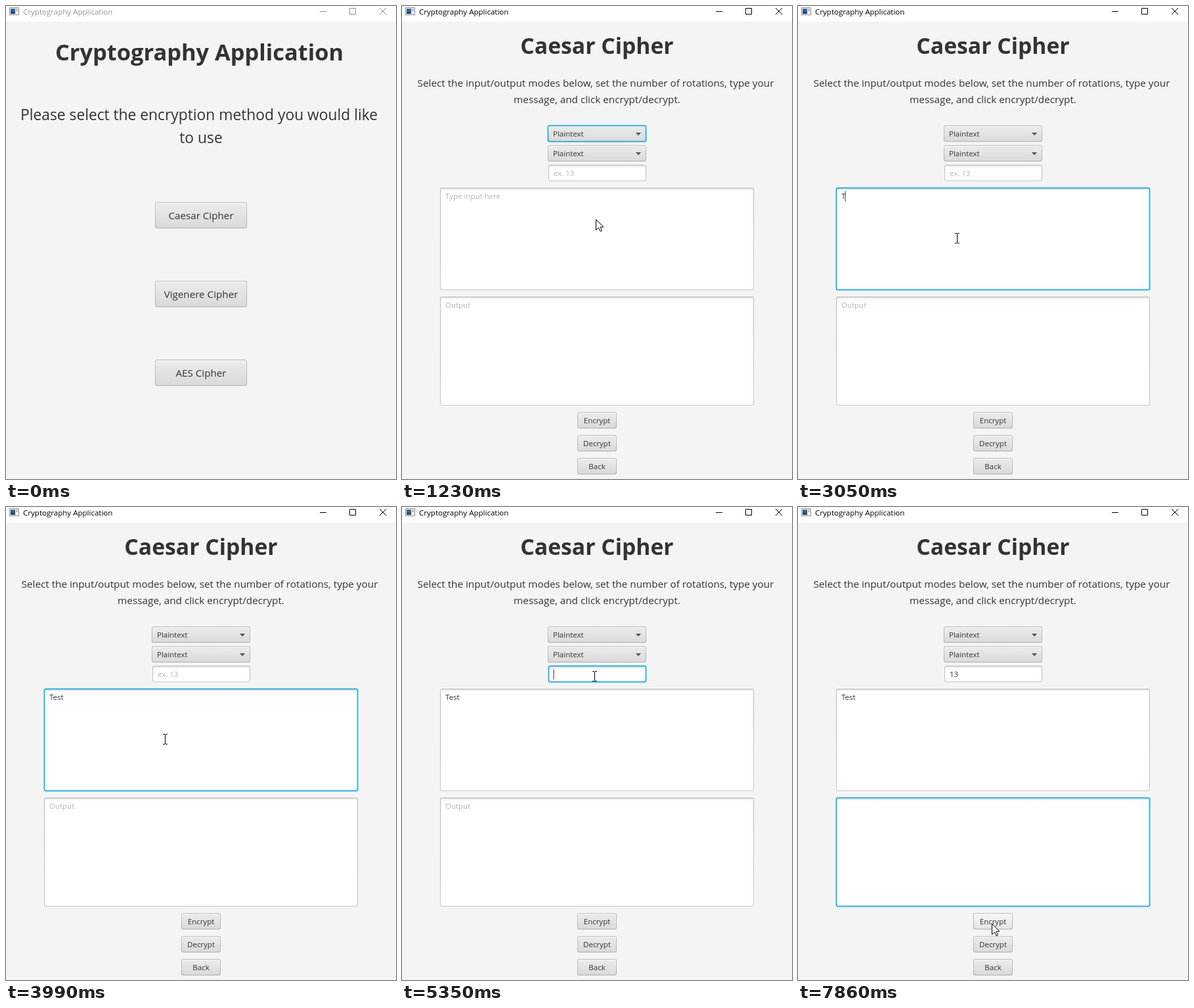
Animation of 594x721 px, one loop 7990 ms. Source, as an HTML page with a canvas:

```html
<!DOCTYPE html>
<html lang="en">
<head>
<meta charset="utf-8">
<title>Cryptography Application</title>
<style>
html, body { margin: 0; width: 100%; height: 100%; overflow: hidden; background: #f4f4f4; }
canvas { display: block; }
</style>
</head>
<body>
<canvas id="stage" width="594" height="721"></canvas>
<script>
const ctx = document.getElementById('stage').getContext('2d');
const LOOP = 7990, INK = '#333', PROMPT = '#afb7b4', FOCUS = '#039ed3', SMALL = 11.5;

// Pointer moves: first step, last step, number of steps, points to pass
const MOVES = [
  [190, 960, 12, [545, 745], [440, 560], [330, 370], [295, 325]],
  [1360, 1770, 7, [296, 270], [297, 222]],
  [1840, 1910, 2, [296, 252]],
  [2180, 2390, 4, [222, 327]],
  [2460, 2720, 4, [242, 354]],
  [4320, 5080, 12, [275, 290], [294, 230], [292, 258]],
  [5350, 5350, 1, [293, 258]],
  [5410, 5480, 2, [293, 259]],
  [5620, 6360, 11, [270, 350], [207, 457]],
  [6430, 6570, 3, [181, 485]],
  [7450, 7860, 7, [240, 570], [305, 628], [295, 635]]
];
const ACTIVE = 1020, PAGE = 1160, INPUT_CLICK = 2720, KEY_CLICK = 5080, OUTPUT_CLICK = 7170;
const MESSAGE_KEYS = [3050, 3250, 3450, 3520], NUMBER_KEYS = [5830, 6070];

const FIRST = [227, 299, 140, 40];
const MODE_IN = [222, 182, 150, 25], MODE_OUT = [222, 212, 150, 25], NUMBER = [223, 242, 149, 25];
const INPUT = [58, 277, 478, 156], OUTPUT = [58, 443, 478, 166];

function pointer(t) {
  let at = null;
  for (const [from, to, steps, ...points] of MOVES) {
    if (t < from) break;
    const path = at ? [at, ...points] : points;
    const step = to > from ? Math.floor((t - from) / (to - from) * (steps - 1) + 1e-6) : 0;
    const u = Math.min(1, (step + 1) / steps) * (path.length - 1);
    const i = Math.min(path.length - 2, Math.floor(u)), f = u - i;
    at = [0, 1].map(k => Math.round(path[i][k] + (path[i + 1][k] - path[i][k]) * f));
  }
  return at;
}

const inside = (p, [x, y, w, h]) => p && p[0] >= x && p[0] < x + w && p[1] >= y && p[1] < y + h;
const typed = (word, keys, t) => word.slice(0, keys.filter(k => t >= k).length);

// The caret restarts its blink at each click or key press
function caretOn(t, start, keys) {
  const last = [start, ...keys].filter(k => k <= t).pop();
  return Math.floor((t - last) / 470 + 1e-6) % 2 === 0;
}

function text(s, x, y, size, { color = INK, align = 'left', weight = 400 } = {}) {
  ctx.font = `${weight} ${size}px "Open Sans", "Noto Sans", sans-serif`;
  ctx.textAlign = align;
  ctx.fillStyle = color;
  ctx.fillText(s, x, y);
}
const centered = (s, y, size, weight, x = 297) => text(s, x, y, size, { align: 'center', weight });

function round([x, y, w, h], inset, r, fill) {
  ctx.beginPath();
  ctx.roundRect(x + inset, y + inset, w - 2 * inset, h - 2 * inset, r);
  ctx.fillStyle = fill;
  ctx.fill();
}

function shade([, y, , h], ...colors) {
  const g = ctx.createLinearGradient(0, y, 0, y + h);
  colors.forEach((c, i) => g.addColorStop(i / (colors.length - 1), c));
  return g;
}

// Solid focus line with a faint glow on both sides
function ring(box, body) {
  round(box, -.2, 3, FOCUS);
  round(box, 1, 2, body);
  round(box, -1.4, 4, 'rgba(3,158,211,.133)');
}

function raised(box, { hover, pressed, focused } = {}) {
  const [light, top, bottom] = pressed ? ['#d6d6d6', '#cfcfcf', '#c2c2c2']
    : hover ? ['#fff', '#f6f6f6', '#e4e4e4'] : ['#fafafa', '#ececec', '#d9d9d9'];
  const edge = shade(box, light, bottom);
  if (focused) {
    ring(box, edge);
  } else {
    round(box, 0, 3, shade(box, '#bcbcbc', '#acacac'));
    round(box, 1, 2, edge);
  }
  round(box, focused ? 2.6 : 2, 1.5, shade(box, top, bottom));
}

function button(label, box, size, state) {
  raised(box, state);
  centered(label, box[1] + box[3] / 2 + (size > 12 ? 6 : 4.5), size);
}

function combo(box, state) {
  raised(box, state);
  const [x, y] = box;
  text('Plaintext', x + 8, y + 17, SMALL);
  ctx.fillStyle = '#555';
  ctx.beginPath();
  ctx.moveTo(x + 134, y + 11);
  ctx.lineTo(x + 142, y + 11);
  ctx.lineTo(x + 138, y + 15.5);
  ctx.fill();
}

function field(box, value, prompt, focused, caret) {
  const [x, y, w] = box;
  if (focused) {
    ring(box, '#fff');
    round(box, 3, 1, '#fff');
  } else {
    round(box, 0, 3, shade(box, '#b8b8b8', '#c8c8c8'));
    round(box, 1, 2, '#fff');
  }
  ctx.fillStyle = shade([0, y + 1, 0, 4], 'rgba(0,0,0,.1)', 'rgba(0,0,0,0)');
  ctx.fillRect(x + 2, y + 1, w - 4, 4);
  const left = x + 8;
  if (value || focused) text(value, left, y + 17, SMALL);
  else text(prompt, left, y + 17, SMALL, { color: PROMPT });
  if (caret) ctx.fillRect(Math.round(left + ctx.measureText(value).width) - .5, y + 5, 1, 16);
}

function titleBar(active) {
  ctx.fillStyle = '#fff';
  ctx.fillRect(0, 0, 594, 24);
  ctx.fillStyle = '#8a8f94';
  ctx.fillRect(5, 2, 15, 12);
  ctx.fillStyle = '#f3f5f6';
  ctx.fillRect(6, 3, 13, 10);
  ctx.fillStyle = shade([0, 4, 0, 8], '#3f78a8', '#1f3f6b');
  ctx.fillRect(7, 4, 7, 8);
  ctx.fillStyle = '#b8bec4';
  ctx.fillRect(15, 4, 3, 4);
  text('Cryptography Application', 26, 13, 11.55, { color: active ? '#000' : '#8f9995' });
  ctx.strokeStyle = active ? '#000' : '#8c8c8c';
  ctx.lineWidth = 1;
  ctx.beginPath();
  ctx.moveTo(478, 8.5); ctx.lineTo(488, 8.5);
  ctx.rect(523.5, 3.5, 9, 9);
  ctx.moveTo(569, 3); ctx.lineTo(579, 13);
  ctx.moveTo(579, 3); ctx.lineTo(569, 13);
  ctx.stroke();
}

function menu(t, p) {
  centered('Cryptography Application', 83, 34.4, 700, 294.5);
  centered('Please select the encryption method you would like', 174, 22.8, 400, 294);
  centered('to use', 209, 22.8);
  ['Caesar Cipher', 'Vigenere Cipher', 'AES Cipher'].forEach((label, i) => {
    const box = [FIRST[0], FIRST[1] + 120 * i, FIRST[2], FIRST[3]];
    const hover = inside(p, box);
    button(label, box, 15.2, { hover, pressed: hover && t >= ACTIVE });
  });
}

function caesar(t, p) {
  centered('Caesar Cipher', 73, 33.7, 700);
  centered('Select the input/output modes below, set the number of rotations, type your', 123, 15.3, 400, 295);
  centered('message, and click encrypt/decrypt.', 148, 15.3);
  const focus = t < INPUT_CLICK ? MODE_IN : t < KEY_CLICK ? INPUT : t < OUTPUT_CLICK ? NUMBER : OUTPUT;
  combo(MODE_IN, { hover: inside(p, MODE_IN), focused: focus === MODE_IN });
  combo(MODE_OUT, { hover: inside(p, MODE_OUT) });
  field(NUMBER, typed('13', NUMBER_KEYS, t), 'ex. 13', focus === NUMBER,
    focus === NUMBER && caretOn(t, KEY_CLICK, NUMBER_KEYS));
  field(INPUT, typed('Test', MESSAGE_KEYS, t), 'Type input here', focus === INPUT,
    focus === INPUT && caretOn(t, INPUT_CLICK, MESSAGE_KEYS));
  field(OUTPUT, '', 'Output', focus === OUTPUT, false);
  ['Encrypt', 'Decrypt', 'Back'].forEach((label, i) => {
    const box = [267, 619 + 35 * i, 60, 25];
    button(label, box, SMALL, { hover: inside(p, box) });
  });
}

function beam(x, y) {
  ctx.fillStyle = '#000';
  ctx.fillRect(x, y - 7, 1, 14);
  for (const row of [y - 8, y + 7]) {
    ctx.fillRect(x - 3, row, 3, 1);
    ctx.fillRect(x + 1, row, 3, 1);
  }
}

function arrow(x, y) {
  const shape = [[0, 0], [0, 16], [4, 12.5], [6.5, 18], [9, 17], [6.5, 11.5], [11.5, 11.5]];
  ctx.beginPath();
  shape.forEach(([dx, dy]) => ctx.lineTo(x + dx + .5, y + dy + .5));
  ctx.closePath();
  ctx.fillStyle = '#fff';
  ctx.strokeStyle = '#000';
  ctx.lineWidth = 1;
  ctx.fill();
  ctx.stroke();
}

function draw(t) {
  const p = pointer(t);
  ctx.fillStyle = '#f4f4f4';
  ctx.fillRect(0, 0, 594, 721);
  titleBar(t >= ACTIVE);
  (t < PAGE ? menu : caesar)(t, p);
  if (!p) return;
  const overText = t >= MOVES[1][0] && [NUMBER, INPUT, OUTPUT].some(box => inside(p, box));
  (overText ? beam : arrow)(...p);
}

const start = performance.now();
function tick() {
  draw((performance.now() - start) % LOOP);
  requestAnimationFrame(tick);
}
tick();
</script>
</body>
</html>
```
